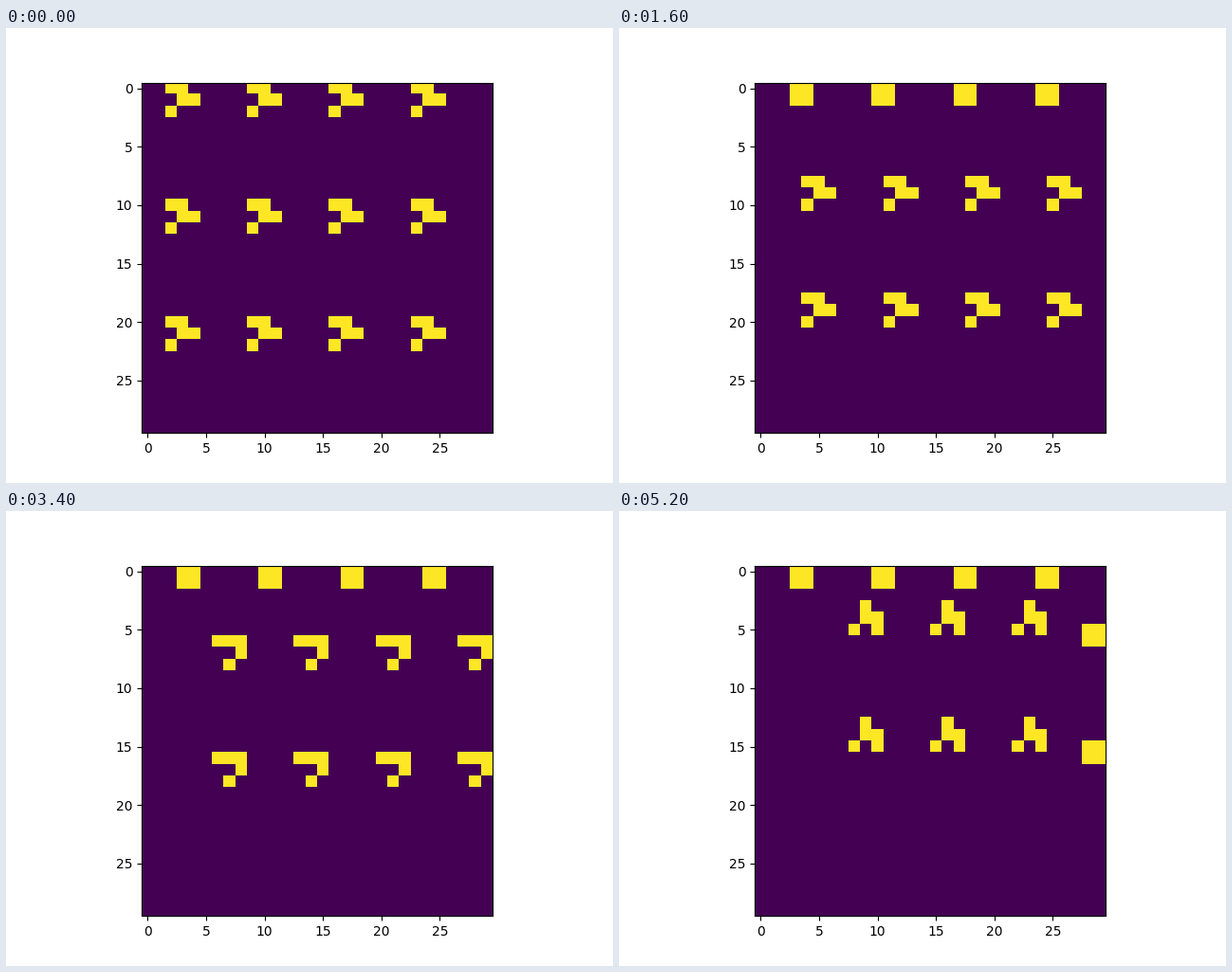
These frames come from a looping animation (640 px wide and 480 px high, 5.4 s). A matplotlib script:

```python
import numpy as np
import matplotlib.pyplot as plt
from matplotlib.animation import FuncAnimation

SIZE = 30
STEPS = 27
INTERVAL = 200
GLIDER = np.array([[1, 1, 0],
                   [0, 1, 1],
                   [1, 0, 0]])


def start_grid():
    grid = np.zeros((SIZE, SIZE), dtype=int)
    for row in range(0, SIZE, 10):
        for col in range(2, 24, 7):
            grid[row:row + 3, col:col + 3] = GLIDER
    return grid


def evolve(grid):
    """One Game of Life generation; everything beyond the edges is dead."""
    padded = np.pad(grid, 1)
    around = sum(padded[r:r + SIZE, c:c + SIZE]
                 for r in range(3) for c in range(3)) - grid
    return ((around == 3) | ((grid == 1) & (around == 2))).astype(int)


generations = [start_grid()]
while len(generations) < STEPS:
    generations.append(evolve(generations[-1]))

fig, ax = plt.subplots(figsize=(6.4, 4.8), dpi=100)
image = ax.imshow(generations[0], cmap="viridis", vmin=0, vmax=1,
                  interpolation="nearest")


def update(step):
    image.set_data(generations[step])
    return [image]


anim = FuncAnimation(fig, update, frames=STEPS, interval=INTERVAL,
                     repeat=True, repeat_delay=0)
plt.show()
```
